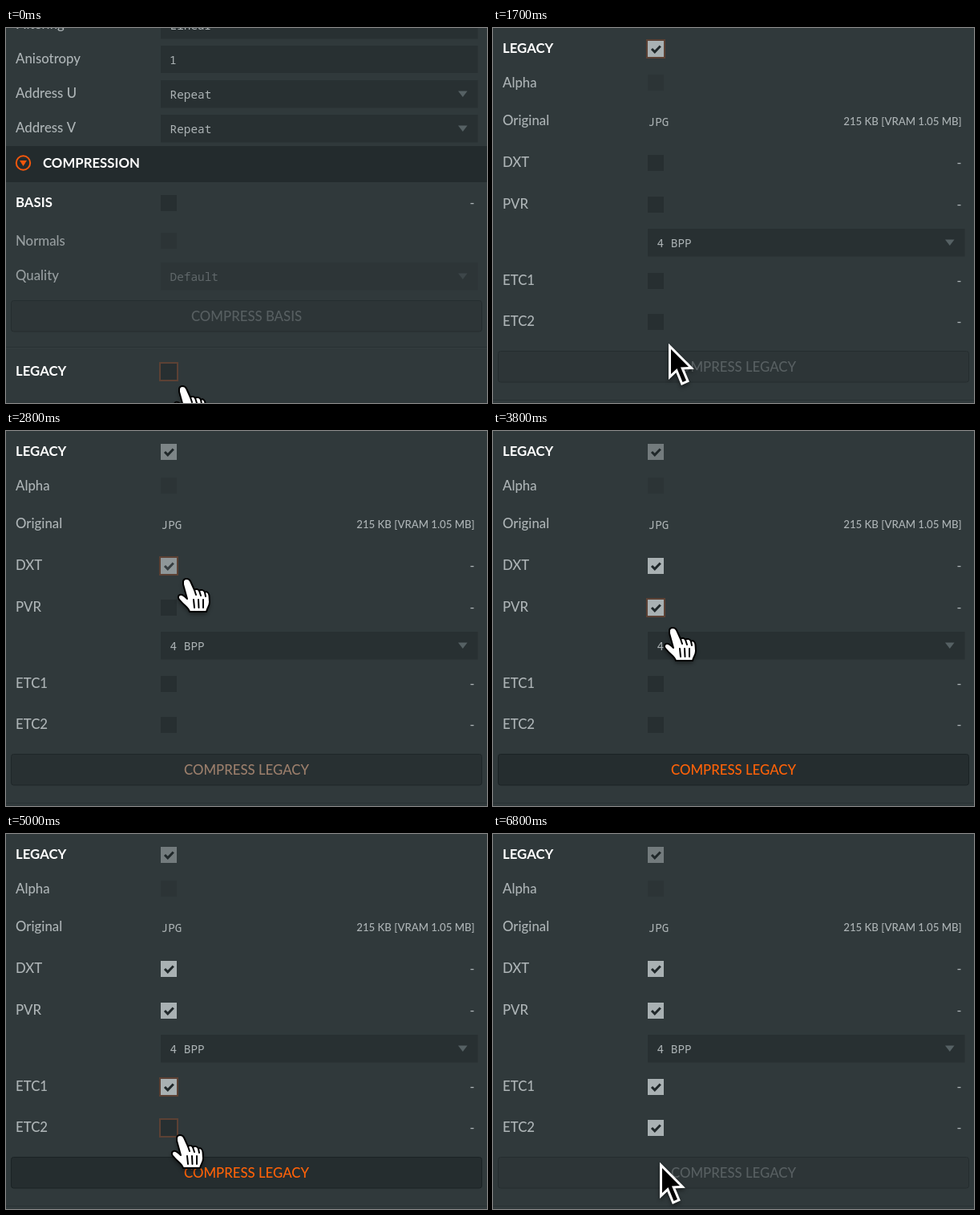
An HTML page with a canvas for the animation above (7600 ms loop, 600 by 467 pixels).

```html
<!DOCTYPE html>
<html lang="en">
<head>
<meta charset="utf-8">
<style>
  html, body { margin: 0; width: 100%; height: 100%; overflow: hidden; background: #30393b; }
  canvas { display: block; }
</style>
</head>
<body>
<canvas id="stage" width="600" height="467"></canvas>
<script>
const ctx = document.getElementById('stage').getContext('2d');
const LOOP = 7600, STEP = 100, SCROLL = 402;
const BG = '#30393b', FIELD = '#283032', LABEL = '#adb4b6';
const SANS = 'Lato, sans-serif', MONO = '"Noto Sans Mono", monospace';

const clamp = v => Math.max(0, Math.min(1, v));
const ramp = (t, start, length) => clamp((t - start) / length);
const smooth = v => v * v * (3 - 2 * v);
const mix = (a, b, f) => a + (b - a) * f;
const mixColor = (a, b, f) => `rgb(${a.map((v, i) => Math.round(mix(v, b[i], f)))})`;

// Pointer hot spot: time, x, y
const path = [
  [0, 208, 428], [1500, 208, 428], [1700, 218, 390], [2200, 227, 158], [2300, 227, 158],
  [2500, 213, 166], [2900, 213, 166], [3400, 212, 227], [3950, 212, 227],
  [4400, 207, 315], [4550, 207, 315], [4900, 205, 357], [5300, 205, 357],
  [5800, 207, 420], [6250, 207, 420], [6500, 207, 406], [LOOP, 207, 406]
];

const CLICK = { legacy: 300, dxt: 2600, pvr: 3500, etc1: 4500, etc2: 5200, compress: 6200 };
const formats = [
  { name: 'DXT', y: 158, on: CLICK.dxt, blur: CLICK.pvr },
  { name: 'PVR', y: 210, on: CLICK.pvr, blur: CLICK.etc1 },
  { name: 'ETC1', y: 305, on: CLICK.etc1, blur: CLICK.etc2 },
  { name: 'ETC2', y: 356, on: CLICK.etc2, blur: CLICK.compress }
];

function pointerAt(t) {
  const i = path.findIndex(k => k[0] > t);
  const [t0, x0, y0] = path[i - 1], [t1, x1, y1] = path[i];
  const f = smooth((t - t0) / (t1 - t0));
  return { x: mix(x0, x1, f), y: mix(y0, y1, f) };
}

function text(str, x, y, { size = 16.8, color = LABEL, font = SANS, weight = 500, align = 'left' } = {}) {
  ctx.font = `${weight} ${size}px ${font}`;
  ctx.fillStyle = color;
  ctx.textAlign = align;
  ctx.fillText(str, x, y);
}

const title = (str, x, y) => text(str, x, y, { weight: 700, color: '#fff' });
const mono = (str, x, y) => text(str, x, y, { size: 14.4, font: MONO, weight: 400 });
const dash = y => text('-', 584.5, y, { align: 'right', size: 16 });

function box(x, y, w, h, color) {
  ctx.fillStyle = color;
  ctx.fillRect(x, y, w, h);
}

function polygon(points) {
  ctx.beginPath();
  points.forEach(([x, y]) => ctx.lineTo(x, y));
  ctx.closePath();
}

function fade(alpha, draw) {
  ctx.save();
  ctx.globalAlpha = alpha;
  draw();
  ctx.restore();
}

function dropdown(y, value, hover) {
  box(193, y, 395.5, 34.5, hover ? '#242b2d' : FIELD);
  mono(value, 204.5, y + 22.5);
  polygon([[564, y + 13.5], [575.5, y + 13.5], [569.8, y + 21]]);
  ctx.fillStyle = '#566164';
  ctx.fill();
}

function checkbox(y, checked = 0, outlined = false) {
  box(193, y, 20, 20, mixColor([39, 47, 49], [169, 177, 179], checked));
  if (outlined) {
    ctx.strokeStyle = '#5c4134';
    ctx.lineWidth = 2;
    ctx.strokeRect(192, y - 1, 22, 22);
  }
  if (checked > 0) fade(checked, () => {
    ctx.beginPath();
    ctx.moveTo(198, y + 10);
    ctx.lineTo(201.8, y + 13.8);
    ctx.lineTo(208.8, y + 6.5);
    ctx.strokeStyle = '#20282a';
    ctx.lineWidth = 3;
    ctx.stroke();
  });
}

function button(y, label, { enabled = 0, tint = 0, hover = false } = {}) {
  ctx.beginPath();
  ctx.roundRect(6.5, y + .5, 587, 38.5, 3);
  ctx.fillStyle = mixColor([45, 53, 55], hover ? [31, 39, 41] : [37, 45, 47], enabled);
  ctx.fill();
  ctx.strokeStyle = mixColor([37, 45, 47], [27, 34, 36], enabled);
  ctx.lineWidth = 1;
  ctx.stroke();
  fade(mix(.32, 1, enabled), () => text(label, 300, y + 25.5, {
    align: 'center', color: mixColor([177, 184, 186], [255, 98, 8], tint)
  }));
}

function separator(y) {
  box(0, y, 600, 1, '#273032');
  box(0, y + 1, 600, 1, '#343d40');
}

function textureSettings() {
  text('Filtering', 12, 1);
  dropdown(-21, 'Linear');
  text('Anisotropy', 12, 44);
  box(193, 22, 395.5, 34, FIELD);
  mono('1', 204, 45);
  text('Address U', 12, 87);
  dropdown(65, 'Repeat');
  text('Address V', 12, 130);
  dropdown(108, 'Repeat');
}

function basisSettings() {
  box(0, 147, 600, 45, '#232b2d');
  ctx.beginPath();
  ctx.arc(21.5, 168, 8.7, 0, 7);
  ctx.strokeStyle = ctx.fillStyle = '#f4570c';
  ctx.lineWidth = 2;
  ctx.stroke();
  polygon([[17, 165], [26, 165], [21.5, 172]]);
  ctx.fill();
  title('COMPRESSION', 46, 174);
  title('BASIS', 12, 223);
  checkbox(208);
  dash(223);
  text('Normals', 12, 271, { color: '#979ea0' });
  fade(.4, () => checkbox(255));
  text('Quality', 12, 314, { color: '#979ea0' });
  fade(.4, () => dropdown(292, 'Default'));
  button(339, 'COMPRESS BASIS');
  separator(397);
}

function legacySettings(t, over) {
  const locked = ramp(t, CLICK.dxt, 250);
  title('LEGACY', 12, 31);
  fade(mix(1, .55, locked), () =>
    checkbox(16, t >= CLICK.legacy ? 1 : 0, t < CLICK.dxt));
  if (t < CLICK.legacy) return;

  text('Alpha', 12, 74);
  fade(.4, () => checkbox(58));
  text('Original', 12, 121);
  mono('JPG', 193.5, 122);
  text('215 KB [VRAM 1.05 MB]', 584.5, 121, { size: 13.2, align: 'right' });
  for (const { name, y, on, blur } of formats) {
    text(name, 12, y + 15);
    const focused = t >= on && t < blur;
    checkbox(y, ramp(t, on, 250), focused || over.checkbox === y);
    dash(y + 15);
  }
  dropdown(250, '4 BPP', over.dropdown);
  const active = 1 - ramp(t, CLICK.compress, 250);
  button(402, 'COMPRESS LEGACY', {
    enabled: ramp(t, CLICK.dxt, 350) * active,
    tint: ramp(t, CLICK.dxt, 650) * active,
    hover: over.button
  });
  separator(463);
}

function hitTest(t, p, scroll) {
  const y = p.y - SCROLL + scroll;
  const inside = (top, bottom) => y >= top && y <= bottom;
  const boxes = [16, ...formats.map(f => f.y)];
  return {
    checkbox: p.x > 190 && p.x < 216 ? boxes.find(top => inside(top - 2, top + 22)) : undefined,
    dropdown: p.x > 193 && inside(250, 284),
    button: t > CLICK.dxt && t < CLICK.compress + STEP && inside(402, 441)
  };
}

function shadow() {
  ctx.shadowColor = 'rgba(0,0,0,.45)';
  ctx.shadowBlur = 5;
  ctx.shadowOffsetY = 3;
}

function arrow(x, y) {
  ctx.save();
  ctx.translate(x, y);
  shadow();
  polygon([[3, 7], [3, 38], [10.5, 31], [17.5, 48], [22, 46], [15, 29.5], [25, 29]]);
  ctx.lineWidth = 6;
  ctx.strokeStyle = '#fff';
  ctx.stroke();
  ctx.shadowColor = 'transparent';
  ctx.fillStyle = '#000';
  ctx.fill();
  ctx.restore();
}

function hand(x, y) {
  ctx.save();
  ctx.translate(x, y);
  shadow();
  ctx.lineJoin = ctx.lineCap = 'round';
  const outline = new Path2D('M-4 3C-3-1 3-1 5 3L10 14C12 12 15 13 16 15C18 13 22 14 23 17C26 15 28 18 28.5 21L29 29C29 34 26 36 25 41L4 41C3 36-3 33-7 28C-11 25-11 21-8 20C-5 19-2 22 1 25L-4 7Z');
  ctx.fillStyle = '#fff';
  ctx.fill(outline);
  ctx.shadowColor = 'transparent';
  ctx.strokeStyle = '#000';
  ctx.lineWidth = 2;
  ctx.stroke(outline);
  ctx.stroke(new Path2D('M10 14L12 20M16 15L18 21M23 17L24 22M9 26L10 36M15 26L15.5 36M21 26L21 36'));
  ctx.restore();
}

function render(t) {
  const scroll = SCROLL * smooth(ramp(t, 300, 500));
  const p = pointerAt(t);
  const over = hitTest(t, p, scroll);

  box(0, 0, 600, 467, BG);
  ctx.save();
  ctx.translate(0, -Math.round(scroll));
  textureSettings();
  basisSettings();
  ctx.translate(0, SCROLL);
  legacySettings(t, over);
  ctx.restore();

  if (over.checkbox !== undefined || over.dropdown || over.button) hand(p.x + 12, p.y + 18);
  else arrow(p.x + 1, p.y + 3);
}

const start = performance.now();
function tick() {
  const t = (performance.now() - start) % LOOP;
  render(Math.floor(t / STEP) * STEP);
  requestAnimationFrame(tick);
}
tick();
</script>
</body>
</html>
```
